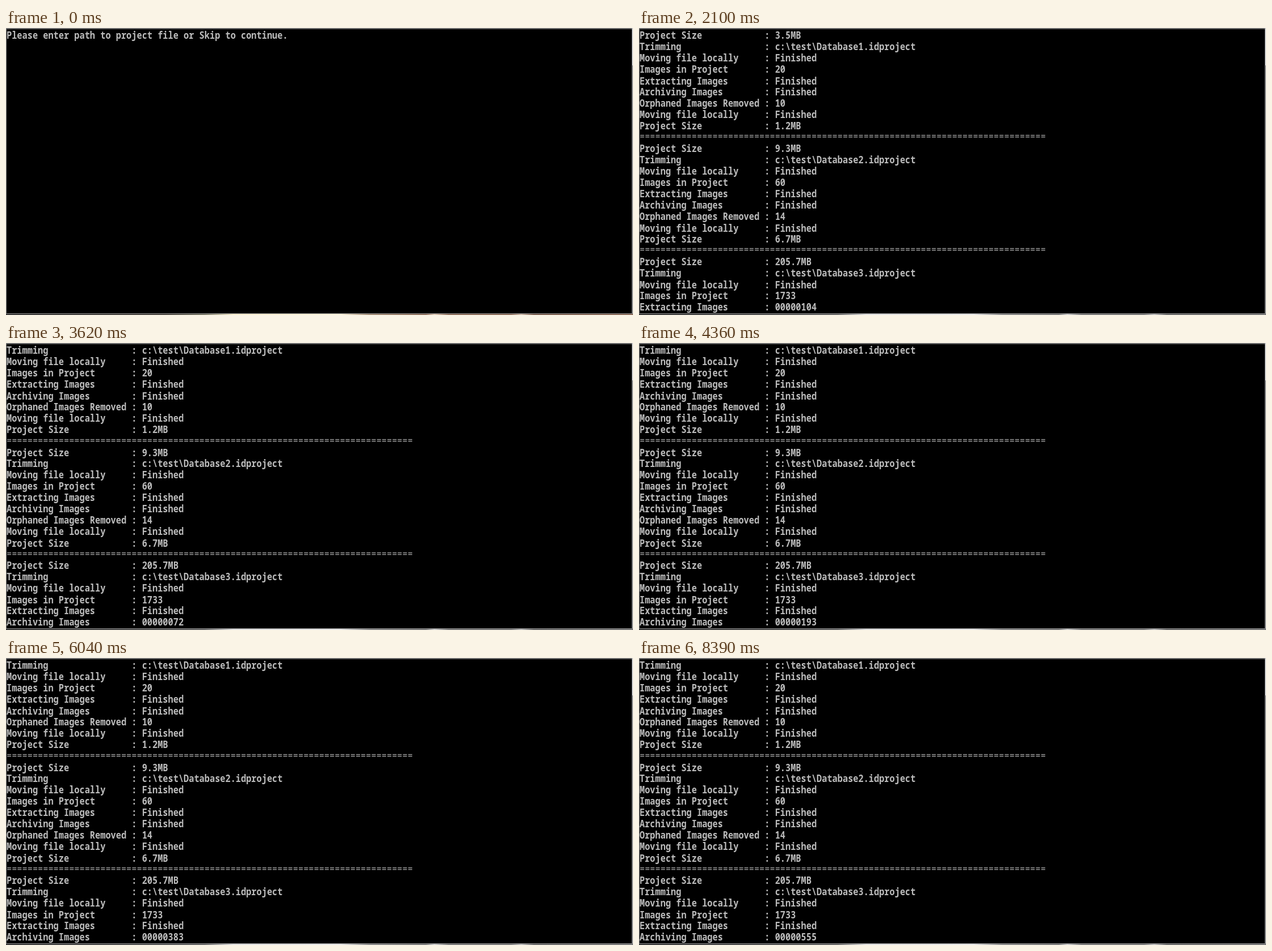
Animation, 1105 px wide and 507 px high, one loop 8.69 s. Source, as an HTML page:

```html
<!DOCTYPE html>
<html lang="en">
<head>
<meta charset="utf-8">
<title>Project trimmer</title>
<style>
  html, body { margin: 0; width: 100%; height: 100%; overflow: hidden; background: #000; }
  #stage { position: relative; width: 1105px; height: 507px; overflow: hidden; background: #000; }
  #stage > * { position: absolute; }
  pre {
    left: 1px; top: 2.5px; margin: 0; color: #bcbcbc;
    font: 600 15.3px/17.391px "Noto Sans Mono", "DejaVu Sans Mono", monospace;
    font-variant-ligatures: none;
    transform: scaleY(1.15); transform-origin: 0 0;
  }
  pre span { position: relative; top: -1.2px; color: #9c9c9c; font-weight: 400; }
  .top { left: 0; top: 0; width: 1105px; height: 2px; background: linear-gradient(#555, #8a8a8a); }
  .left { left: 0; top: 0; width: 1px; height: 505px; background: #8c8c8c; }
  .right { left: 1103px; top: 0; width: 1px; height: 505px; background: #b4b4b4; }
  .edge { left: 1104px; top: 0; width: 1px; height: 505px; background: linear-gradient(#ddd 66px, #777 66px); }
  .bottom { left: 0; top: 504px; width: 1105px; height: 1px; background: #888; }
  .desk {
    left: 0; top: 505px; width: 1105px; height: 2px;
    background: linear-gradient(90deg, #333, #555 280px, #666 350px, #ddd 400px, #e4e4e4 590px,
      #888 640px, #777 740px, #ccc 755px, #777 780px, #777 890px, #bbb 908px, #666 930px, #777);
  }
  .desk.warm {
    background: linear-gradient(90deg, #333, #4a4540 280px, #776 350px, #f2e8c8 400px, #f6eed6 590px,
      #a08a74 640px, #8a6a58 740px, #dcc8b4 755px, #8a6a58 780px, #8a6a58 890px, #ccb8a8 908px, #765a4c 930px, #8a6a58);
  }
</style>
</head>
<body>
<div id="stage">
  <pre id="console"></pre>
  <div class="top"></div>
  <div class="left"></div>
  <div class="right"></div>
  <div class="edge"></div>
  <div class="bottom"></div>
  <div class="desk" id="desk"></div>
  <svg id="pointer" width="1105" height="507">
    <path d="M231 304V330L236 325.500L240 334.500L243.500 333L239.500 323.500H245Z" fill="#e6e6e6" stroke="#222" stroke-width=".8"/>
  </svg>
</div>
<script>
const LOOP = 8690, ROWS = 25;
const [out, desk, pointer] = ["console", "desk", "pointer"].map(id => document.getElementById(id));

const row = (label, value) => label.padEnd(24) + ": " + value;
const counter = n => String(Math.round(n)).padStart(8, "0");

const report = (id, before, images, orphans, after) => [
  `<span>${"=".repeat(78)}</span>`,
  row("Project Size", before),
  row("Trimming", `c:\\test\\Database${id}.idproject`),
  row("Moving file locally", "Finished"),
  row("Images in Project", images),
  row("Extracting Images", "Finished"),
  row("Archiving Images", "Finished"),
  row("Orphaned Images Removed", orphans),
  row("Moving file locally", "Finished"),
  row("Project Size", after)
];
const log = [
  ...report(1, "3.5MB", 20, 10, "1.2MB"),
  ...report(2, "9.3MB", 60, 14, "6.7MB"),
  ...report(3, "205.7MB", 1733, "", "")
];

// Each image takes longer than the last, so the squared count grows evenly.
const extracted = [[1900, 0], [3150, 261], [3400, 286]];
const archived = [[3400, 0], [3490, 5], [4360, 193], [6040, 383], [7240, 480], [8390, 555]];
function countAt(t, keys) {
  const i = Math.max(1, keys.findIndex(k => k[0] >= t));
  const [[t0, a], [t1, b]] = [keys[i - 1], keys[i]];
  return Math.sqrt(a * a + (b * b - a * a) * (t - t0) / (t1 - t0));
}

// The console refreshes in steps that get shorter towards the end.
function refreshTime(t) {
  if (t >= 8390) return 8390;
  if (t >= 3500) return Math.min(8260, Math.floor((t - 10) / 30) * 30 + 10);
  if (t >= 3400) return 3400;
  if (t >= 2100) return Math.floor(t / 50) * 50;
  return 1900;
}

// [start, finished lines, activity, count]
const stages = [
  [600, 5, "Extracting Images", 12],
  [900, 15, "Extracting Images", 24],
  [1200, 16, "Archiving Images", 11],
  [1500, 18],
  [1600, 23],
  [1900, 25, "Extracting Images", extracted],
  [3400, 26, "Archiving Images", archived]
];

function screenAt(t) {
  const stage = stages.findLast(s => t >= s[0]);
  if (!stage) return "Please enter path to project file or Skip to continue.";
  const [, done, activity, count] = stage;
  const lines = log.slice(0, done);
  if (activity) {
    lines.push(row(activity, counter(Array.isArray(count) ? countAt(refreshTime(t), count) : count)));
  }
  return lines.slice(-ROWS).join("\n");
}

let shown;
function draw() {
  const t = performance.now() % LOOP;
  const text = screenAt(t);
  if (text !== shown) out.innerHTML = shown = text;
  desk.classList.toggle("warm", t < 300);
  pointer.style.display = t >= 300 && t < 1900 ? "" : "none";
  requestAnimationFrame(draw);
}
draw();
</script>
</body>
</html>
```
